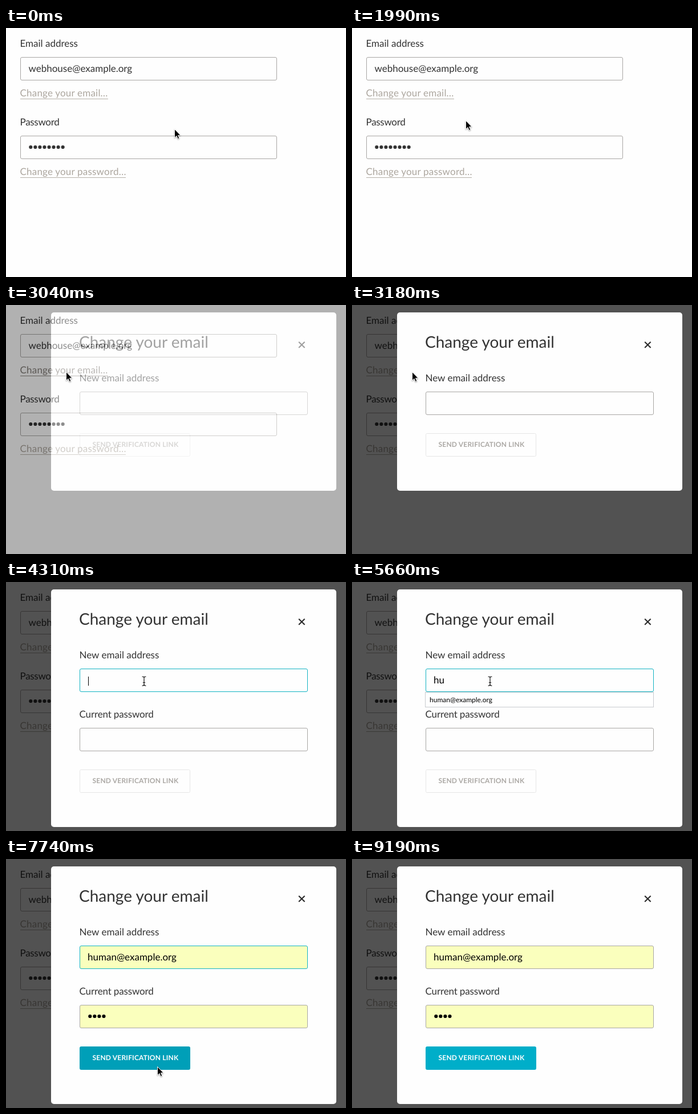
Animation of 596x437 px, one loop 9290 ms. Source, as an HTML page:

```html
<!DOCTYPE html>
<html lang="en">
<head>
<meta charset="utf-8">
<title>Change your email</title>
<style>
  html, body { margin: 0; width: 100%; height: 100%; overflow: hidden; background: #fefefe; }
  svg { position: absolute; overflow: visible; display: block; }
  text { font: 17px Lato, "Open Sans", sans-serif; fill: #333; white-space: pre; text-rendering: geometricPrecision; }
  .stage { position: absolute; inset: 0; overflow: hidden; }

  .field { fill: #fefefe; stroke: #a8a6a4; }
  .dots { stroke: #333; stroke-width: 6.2; stroke-linecap: round; stroke-dasharray: 0 8.05; }
  .link text { fill: #aca69e; letter-spacing: .2px; }
  .link path { stroke: #b5b0a8; }
  .title { font-size: 28px; }
  .cta text { font-size: 12px; font-weight: 700; letter-spacing: .2px; }
  .typed, .popup text { fill: #000; }
  .popup text { font-size: 12px; }
  .arrow { filter: drop-shadow(0 1px 1px rgba(0, 0, 0, .4)); }

  /* The page shade is the dialog's own shadow, so both fade together. */
  .modal {
    position: absolute; left: 79px; top: 13px; width: 500px; height: 313px;
    border-radius: 5px; background: #fefefe; box-shadow: 0 0 0 800px rgba(0, 0, 0, .68);
  }
  .modal svg { left: -79px; top: -13px; }

  .modal, .step, .move { animation-duration: 9.29s; animation-iteration-count: infinite; }
  .modal { animation-name: fade, grow; animation-timing-function: step-end, linear; }
  .step { animation-timing-function: step-end; }
  .move { animation-timing-function: linear; }

  @keyframes fade {
    0% { opacity: 0; }
    32.078% { opacity: .165; }
    32.723% { opacity: .45; }
    33.477% { opacity: .75; }
    34.23%, 100% { opacity: 1; }
  }
  @keyframes grow {
    0%, 41.981% { height: 313px; animation-timing-function: ease-out; }
    46.394%, 100% { height: 417px; }
  }
  @keyframes drop {
    0%, 41.981% { transform: translateY(0); animation-timing-function: ease-out; }
    46.394%, 100% { transform: translateY(104px); }
  }
  @keyframes reveal {
    0%, 42.8% { opacity: 0; }
    46.394%, 100% { opacity: 1; }
  }

  @keyframes text-hover {
    0%, 34.23%, 100% { fill: #aca69e; }
    25.619% { fill: #827d78; }
  }
  @keyframes line-hover {
    0%, 34.23%, 100% { stroke: #b5b0a8; }
    25.619% { stroke: #8f8a84; }
  }

  @keyframes focus {
    0%, 98.924%, 100% { stroke: #a8a6a4; }
    41.981% { stroke: #12b3c3; }
  }
  @keyframes autofill {
    0% { fill: #fefefe; }
    63.832%, 100% { fill: #faffbd; }
  }
  #mail { animation-name: focus, autofill; }
  #pass { animation-name: autofill; }

  @keyframes one { 0%, 55.436%, 100% { opacity: 0; } 53.175% { opacity: 1; } }
  @keyframes two { 0%, 63.832%, 100% { opacity: 0; } 55.436% { opacity: 1; } }
  @keyframes filled { 0% { opacity: 0; } 63.832%, 100% { opacity: 1; } }
  @keyframes popup { 0%, 66.308%, 100% { opacity: 0; } 53.175% { opacity: 1; } }
  @keyframes pick { 0% { fill: #fff; } 63.832%, 100% { fill: #cdcdcd; } }

  @keyframes blink {
    0%, 51.884%, 60.926%, 72.121%, 82.8%, 93.219%, 100% { opacity: 0; }
    41.981%, 53.175%, 66.308%, 77.287%, 87.836% { opacity: 1; }
  }
  @keyframes caret-x {
    0% { transform: translateX(0); }
    53.175% { transform: translateX(9px); }
    55.436% { transform: translateX(19px); }
    66.308%, 100% { transform: translateX(158px); }
  }
  #caret { animation-name: blink, caret-x; }

  @keyframes cta-box {
    0% { fill: #fefefe; stroke: #e6e6e6; }
    66.308%, 89.343%, 100% { fill: #00aec9; stroke: #00aec9; }
    81.593% { fill: #009fb8; stroke: #009fb8; }
  }
  @keyframes cta-text { 0% { fill: #aba8a4; } 66.308%, 100% { fill: #fff; } }

  @keyframes pointer {
    0%, .9% { transform: translate(295px, 177px); }
    2.691%, 21.421% { transform: translate(199px, 162px); animation-timing-function: ease-in-out; }
    27.234%, 37.5% { transform: translate(105px, 117px); animation-timing-function: ease-in-out; }
    41.442%, 72% { transform: translate(242px, 174px); animation-timing-function: ease-in-out; }
    77.287%, 78.902% { transform: translate(383px, 336px); animation-timing-function: ease-in-out; }
    83.315%, 87.7% { transform: translate(265px, 364px); animation-timing-function: ease-in; }
    90.42%, 100% { transform: translate(258px, 390px); }
  }
  @keyframes arrow {
    0%, 72.659% { opacity: 1; }
    40.474%, 90.42%, 100% { opacity: 0; }
  }
  @keyframes beam {
    0%, 72.659%, 100% { opacity: 0; }
    40.474% { opacity: 1; }
  }
</style>
</head>
<body>
<div class="stage">
  <svg width="596" height="437">
    <text x="24.5" y="33">Email address</text>
    <rect class="field" x="25.5" y="51.5" width="449" height="40" rx="2.5"/>
    <text x="39.5" y="77">webhouse@example.org</text>
    <g class="link">
      <text class="step" style="animation-name: text-hover" x="24.5" y="120">Change your email…</text>
      <path class="step" style="animation-name: line-hover" d="M25 124.5H179"/>
    </g>

    <text x="24.5" y="171" letter-spacing="-.3">Password</text>
    <rect class="field" x="25.5" y="189.5" width="449" height="40" rx="2.5"/>
    <path class="dots" d="M43.3 209h57"/>
    <g class="link">
      <text x="24.5" y="258">Change your password…</text>
      <path d="M25 262.5H210"/>
    </g>
  </svg>

  <div class="modal">
    <svg width="596" height="437">
      <text class="title" x="128" y="75">Change your email</text>
      <path d="M513.2 64.7l10.4 10.4m0-10.4l-10.4 10.4" stroke="#2b2b2b" stroke-width="2.1"/>

      <text x="128.5" y="134">New email address</text>
      <rect class="field step" id="mail" x="129.5" y="152.5" width="399" height="40" rx="2.5"/>
      <text class="typed step" style="animation-name: one" x="143" y="178">h</text>
      <text class="typed step" style="animation-name: two" x="143" y="178">hu</text>
      <text class="typed step" style="animation-name: filled" x="143" y="178">human@example.org</text>
      <rect class="step" id="caret" x="144" y="166" width="1" height="16"/>

      <g class="move" style="animation-name: reveal">
        <text x="128.5" y="238" letter-spacing="-.15">Current password</text>
        <rect class="field step" id="pass" x="129.5" y="256.5" width="399" height="40" rx="2.5"/>
        <path class="dots step" style="animation-name: filled; stroke: #000" d="M147.3 276h25"/>
      </g>

      <g class="cta move" style="animation-name: drop">
        <rect class="step" style="animation-name: cta-box" x="129.5" y="225.5" width="193" height="40" rx="2"/>
        <text class="step" style="animation-name: cta-text" x="151.5" y="249">SEND VERIFICATION LINK</text>
      </g>

      <g class="popup step" style="animation-name: popup">
        <rect x="128.5" y="193.5" width="400" height="26" fill="#fff" stroke="#c7cace"/>
        <rect class="step" style="animation-name: pick" x="129" y="194" width="399" height="25"/>
        <text x="136" y="211">human@example.org</text>
      </g>
    </svg>
  </div>

  <svg width="596" height="437">
    <g class="move" style="animation-name: pointer">
      <path class="arrow step" style="animation-name: arrow" fill="#000" stroke="#fff"
        d="M.5 .5V15.6L4 12.4 6.3 17.6 8.8 16.5 6.5 11.4H11Z"/>
      <path class="step" style="animation-name: beam" fill="none" stroke="#111" stroke-width="1.2" stroke-linecap="round"
        d="M-3-8Q0-8 0-6V6Q0 8-3 8M3-8Q0-8 0-6M0 6Q0 8 3 8M-1.6 2.5H1.6"/>
    </g>
  </svg>
</div>
</body>
</html>
```
